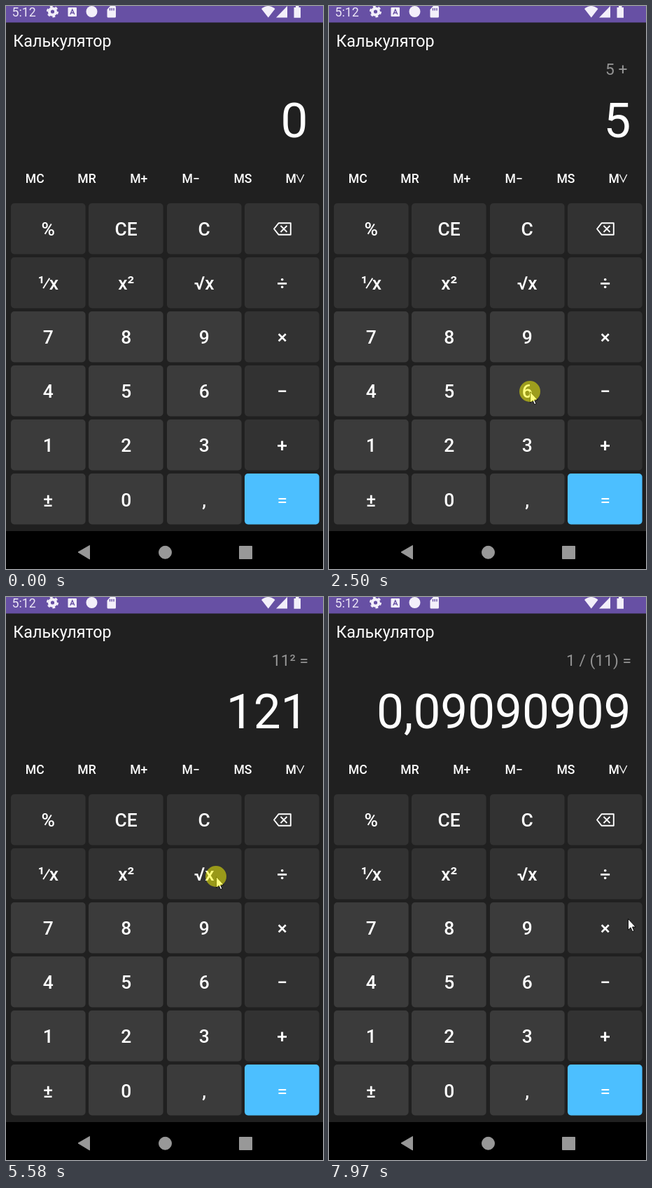
An HTML page that plays this animation: 453 by 802 pixels, repeating every 8 s.

```html
<!DOCTYPE html>
<html lang="ru">
<head>
<meta charset="utf-8">
<title>Калькулятор</title>
<style>
html, body { margin: 0; width: 100%; height: 100%; overflow: hidden; background: #202020; }
svg { display: block; width: 453px; height: 802px; }
text { font-family: Roboto, "Noto Sans", sans-serif; fill: #fff; white-space: pre; }
.key { font-size: 26.4px; font-weight: 500; text-anchor: middle; }
.mem { font-size: 17.6px; font-weight: 500; text-anchor: middle; }
.out { text-anchor: end; }
</style>
</head>
<body>
<svg viewBox="0 0 453 802">
  <rect width="453" height="802" fill="#202020"/>
  <rect width="453" height="23.5" fill="#6750a4"/>
  <g fill="#f3effa">
    <text x="8.5" y="15" font-size="17.8" style="fill:#ece6f6">5:12</text>
    <circle cx="66.5" cy="8" r="4.6" fill="none" stroke="#f3effa" stroke-width="4"/>
    <circle cx="66.5" cy="8" r="7.3" fill="none" stroke="#f3effa" stroke-width="2.4" stroke-dasharray="3.82"/>
    <rect x="88.5" y="2" width="12.5" height="13" rx="1"/>
    <path d="M91.8 12 94.8 5 97.8 12M92.8 9.8H96.8" fill="none" stroke="#6750a4" stroke-width="1.4"/>
    <circle cx="122.5" cy="8" r="8"/>
    <path d="M149 0H155.500Q157 0 157 1.500V15Q157 16.500 155.500 16.500H146Q144.500 16.500 144.500 15V5Z"/>
    <path d="M148.500 3V6.500M151.200 3V6.500M154 3V6.500" stroke="#6750a4" stroke-width="1.4"/>
    <path d="M365 4Q374.500-4 384.500 4L374.800 16.500Z"/>
    <path d="M402 0V16.500H386Z"/>
    <path d="M411.500 2H414V0H418.500V2H421V16.800H411.500Z"/>
  </g>
  <text x="10.3" y="57.5" font-size="23.3">Калькулятор</text>
  <text id="expr" class="out" x="432" y="98" font-size="22.8" style="fill:#949494"></text>
  <text id="value" class="out" x="431.5" y="187" font-size="69.2"></text>
  <g id="keys"></g>
  <text class="mem" x="407.2" y="252">M</text>
  <g fill="none" stroke="#fff">
    <path d="M415.300 240 420.500 250.500 425.700 240" stroke-width="1.3"/>
    <path d="M383 317.500 389.500 309.300H406.800V325.700H389.500ZM392.500 313 401.500 322M401.500 313 392.500 322" stroke-width="1.9" stroke-linejoin="round"/>
  </g>
  <rect y="748" width="453" height="54"/>
  <g fill="#989898" stroke="#989898" stroke-linejoin="round">
    <path d="M103 778 119.500 768.500V788Z"/>
    <circle cx="227.5" cy="778.3" r="9"/>
    <rect x="333.5" y="769.5" width="18" height="18"/>
  </g>
  <path id="cursor" d="M.5.5V16.300L4.100 12.900 6.600 18.600 8.900 17.600 6.500 12H11.200Z" fill="#fff" stroke="#000" stroke-width=".9"/>
  <circle id="tap" r="15" fill="#ff0" fill-opacity=".5"/>
</svg>
<script>
const $ = id => document.getElementById(id);
const LOOP = 8000, STEP = 68.2, START = 190;
const TAP = 80, DELAY = 135; // tap mark length, time from tap to result

// Keypad
const rows = ["% CE C _", "¹⁄x x² √x ÷", "7 8 9 ×", "4 5 6 −", "1 2 3 +", "± 0 , ="];
let markup = "";
["MC", "MR", "M+", "M−", "MS"].forEach((label, i) => {
  markup += `<text class="mem" x="${41.2 + 74.3 * i}" y="252">${label}</text>`;
});
rows.forEach((row, r) => row.split(" ").forEach((label, c) => {
  const x = Math.floor(7 + c * 111.5), y = Math.round(280.7 + r * 77.15);
  const equals = label === "=";
  const fill = equals ? "#4cbfff" : r > 1 && c < 3 ? "#3b3b3b" : "#323232";
  markup += `<rect x="${x}" y="${y}" width="106.6" height="72.4" rx="4.8" fill="${fill}"/>`;
  if (label === "_") return;
  const tight = label.replace("⁄x", '<tspan dx="-3.5">⁄</tspan><tspan dx="-2">x</tspan>');
  markup += `<text class="key" x="${60.2 + c * 111.5}" y="${Math.round(326.6 + r * 77.2)}"
    ${equals ? 'style="font-weight:400"' : ""}>${tight}</text>`;
}));
$("keys").innerHTML = markup;

// The pointer leaves, arrives at x, y, and may tap to show a new expression and value
const visits = [
  { leave: 190, arrive: 600, x: 180, y: 551, tap: 1005, expr: "", value: "5" },
  { leave: 1100, arrive: 1750, x: 394, y: 634, tap: 1820, expr: "5 + ", value: "5" },
  { leave: 1960, arrive: 2430, x: 287, y: 549, tap: 2495, expr: "5 + ", value: "6" },
  { leave: 2600, arrive: 3180, x: 394, y: 732, tap: 3240, expr: "5 + 6", value: "11" },
  { leave: 3400, arrive: 3800, x: 125, y: 412 },
  { leave: 4030, arrive: 4560, x: 194, y: 407, tap: 4605, expr: "11² =", value: "121" },
  { leave: 4850, arrive: 5520, x: 300, y: 398, tap: 5575, expr: "√(121) =", value: "11" },
  { leave: 5940, arrive: 6330, x: 72, y: 400, tap: 6795, expr: "1 / (11) =", value: "0,09090909" },
  { leave: 6940, arrive: 7550, x: 347, y: 395 },
  { leave: 7550, arrive: 7960, x: 427, y: 458 }
];

function cursorAt(t) {
  let x = 364, y = 746;
  for (const v of visits) {
    if (t < v.leave) break;
    const p = Math.min(1, (t - v.leave) / (v.arrive - v.leave));
    const e = (p + p * p * (3 - 2 * p)) / 2;
    x += (v.x - x) * e;
    y += (v.y - y) * e;
  }
  return [Math.round(x), Math.round(y)];
}

function draw(t) {
  const shown = visits.findLast(v => v.tap + DELAY <= t) || { expr: "", value: "0" };
  $("expr").textContent = shown.expr;
  $("value").textContent = shown.value;
  // the pointer is updated at a coarse fixed rate
  const tick = START + Math.max(0, Math.floor((t - START + 16) / STEP)) * STEP;
  const at = `translate(${cursorAt(tick)})`;
  $("cursor").setAttribute("transform", at);
  $("tap").setAttribute("transform", at);
  $("cursor").style.display = t < START ? "none" : "";
  $("tap").style.display = visits.some(v => t >= v.tap && t < v.tap + TAP) ? "" : "none";
}

const begin = performance.now();
function frame() {
  draw((performance.now() - begin) % LOOP);
  requestAnimationFrame(frame);
}
frame();
</script>
</body>
</html>
```
